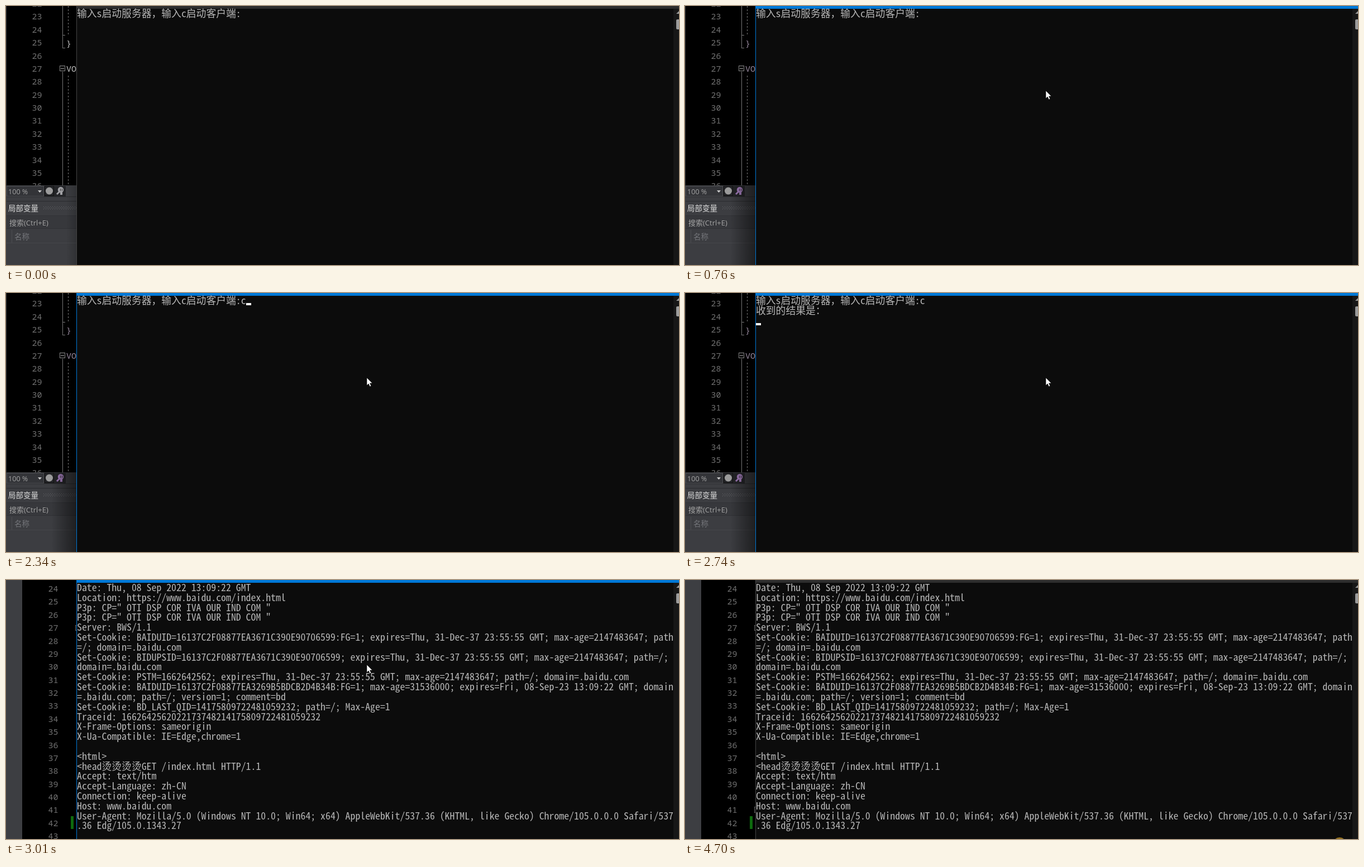
An HTML page with a canvas for the animation above (4770 ms loop, 1205x465 px).

```html
<!DOCTYPE html>
<html lang="zh-CN">
<head>
<meta charset="utf-8">
<style>
  html, body { margin: 0; width: 100%; height: 100%; overflow: hidden; background: #000; }
  canvas { display: block; }
</style>
</head>
<body>
<canvas id="stage" width="1205" height="465"></canvas>
<script>
const ctx = document.getElementById('stage').getContext('2d');
const LOOP = 4770, CELL = 8.9, ROW = 17.81, LEFT = 127;
const MONO = '"Noto Sans Mono CJK SC", "Liberation Mono", monospace';
const UI = '"Open Sans", "Noto Sans CJK SC", "Noto Sans CJK", sans-serif';
const CODE = '"Noto Sans Mono", monospace';

// Latin characters fill one terminal cell, Chinese ones two.
ctx.font = `300 100px ${MONO}`;
const latinFont = `300 ${CELL * 100 / ctx.measureText('M').width}px ${MONO}`;
const wideFont = `300 ${CELL * 2}px "Noto Sans Mono CJK SC", "Noto Sans CJK SC", "Noto Sans CJK", sans-serif`;

const PROMPT = '输入s启动服务器，输入c启动客户端:';
const RESPONSE = `Date: Thu, 08 Sep 2022 13:09:22 GMT
Location: https://www.baidu.com/index.html
P3p: CP=" OTI DSP COR IVA OUR IND COM "
P3p: CP=" OTI DSP COR IVA OUR IND COM "
Server: BWS/1.1
Set-Cookie: BAIDUID=16137C2F08877EA3671C390E90706599:FG=1; expires=Thu, 31-Dec-37 23:55:55 GMT; max-age=2147483647; path
=/; domain=.baidu.com
Set-Cookie: BIDUPSID=16137C2F08877EA3671C390E90706599; expires=Thu, 31-Dec-37 23:55:55 GMT; max-age=2147483647; path=/;
domain=.baidu.com
Set-Cookie: PSTM=1662642562; expires=Thu, 31-Dec-37 23:55:55 GMT; max-age=2147483647; path=/; domain=.baidu.com
Set-Cookie: BAIDUID=16137C2F08877EA3269B5BDCB2D4B34B:FG=1; max-age=31536000; expires=Fri, 08-Sep-23 13:09:22 GMT; domain
=.baidu.com; path=/; version=1; comment=bd
Set-Cookie: BD_LAST_QID=14175809722481059232; path=/; Max-Age=1
Traceid: 1662642562022173748214175809722481059232
X-Frame-Options: sameorigin
X-Ua-Compatible: IE=Edge,chrome=1

<html>
<head烫烫烫烫GET /index.html HTTP/1.1
Accept: text/htm
Accept-Language: zh-CN
Connection: keep-alive
Host: www.baidu.com
User-Agent: Mozilla/5.0 (Windows NT 10.0; Win64; x64) AppleWebKit/537.36 (KHTML, like Gecko) Chrome/105.0.0.0 Safari/537
.36 Edg/105.0.1343.27`;

// Pointer positions: [from ms, x, y]
const POINTER = [
  [130, 1093, 441], [200, 968, 374], [270, 826, 292], [340, 714, 222],
  [410, 648, 176], [480, 624, 159], [550, 632, 154], [620, 646, 153],
  [760, 646, 152], [3810, 692, 200], [3880, 806, 312], [3950, 963, 452], [4020, 0, -50]
];

function box(x, y, w, h, color) {
  ctx.fillStyle = color;
  ctx.fillRect(x, y, w, h);
}

function frame(x, y, w, h, color) {
  ctx.strokeStyle = color;
  ctx.strokeRect(x + .5, y + .5, w - 1, h - 1);
}

function shape(color, ...points) {
  ctx.fillStyle = color;
  ctx.beginPath();
  points.forEach(([x, y]) => ctx.lineTo(x, y));
  ctx.closePath();
  ctx.fill();
}

function disc(x, y, r, color) {
  ctx.fillStyle = color;
  ctx.beginPath();
  ctx.arc(x, y, r, 0, 7);
  ctx.fill();
}

function label(text, x, y, color, font, align = 'left') {
  ctx.font = font;
  ctx.fillStyle = color;
  ctx.textAlign = align;
  ctx.fillText(text, x, y);
}

function lineNumbers(first, last, right, y) {
  for (let n = first; n <= last; n++)
    label(n, right, Math.round(y + (n - first) * 23.38), '#707070', `15px ${CODE}`, 'right');
}

function dashes(x, from, to) {
  for (let y = from; y < to; y += 6) box(x, y, 1, Math.min(3, to - y), '#777');
}

function editorWithPanel(active) {
  const codeColor = active ? '#95879c' : '#c0c0c0';
  lineNumbers(22, 36, 64.5, 1);
  box(101, 0, 1, 76, '#777');
  box(101, 52, 5, 1, '#777');
  box(101, 75, 5, 1, '#777');
  dashes(111, 0, 53);
  box(101, 118, 1, 205, '#777');
  dashes(111, 125, 322);
  frame(96, 107, 10, 10, '#888');
  box(98, 112, 6, 1, '#aaa');
  label('}', 108, 71.5, codeColor, `15px ${CODE}`);
  label('VO', 108, 118, codeColor, `15px ${CODE}`);

  // Zoom bar
  box(0, 322, 126, 143, '#3c3d41');
  box(1, 323, 66, 19, '#333438');
  frame(1, 323, 67, 19, '#4b4c50');
  label('100 %', 4, 337.5, '#a4a4a4', `12.6px ${UI}`);
  shape('#ccc', [57, 331], [64, 331], [60.5, 335]);
  box(68, 323, 39, 19, '#242528');
  frame(69, 323, 17, 18, '#111');
  disc(77.5, 332, 6.5, '#9b9b9b');
  const tool = active ? '#a27cba' : '#a0a0a4';
  disc(98, 330, 5.2, tool);
  shape(tool, [90, 337], [92, 339], [97, 334], [95, 332]);
  box(97, 333, 4, 6, tool);
  box(97, 328, 1, 4, '#333');
  box(100, 328, 1, 4, '#333');
  box(0, 342, 126, 1, '#2c2d30');

  // Locals panel
  box(0, 350, 126, 1, '#2a2b2e');
  label('局部变量', 4, 368, '#ddd', `13.5px ${UI}`);
  for (let x = 67; x < 126; x += 4) {
    box(x, 360, 1, 1, '#66676b');
    box(x + 2, 362, 1, 1, '#66676b');
    box(x, 364, 1, 1, '#66676b');
  }
  box(0, 376, 126, 24, '#37383c');
  frame(0, 376, 130, 24, '#303135');
  label('搜索(Ctrl+E)', 6, 394, '#a4a4a4', `13px ${UI}`);
  box(10, 402, 1, 23, '#4b4c50');
  box(1, 425, 125, 1, '#46474b');
  label('名称', 15, 419, '#74757a', `13.5px ${UI}`);
  box(0, 0, 1, 465, '#3c3d41');
}

function editorOnly(time) {
  box(0, 0, 29, 465, '#3d3e42');
  lineNumbers(24, 43, 93.5, 21);
  box(116, 424, 5, 23, '#0e6a0e');
  if (time >= 3010) frame(124, 81, 9, 10, '#666');
  if (time >= 3280) frame(124, 407, 9, 11, '#666');
}

function terminalLine(text, row) {
  const baseline = Math.round(20 + row * ROW);
  let col = 0;
  ctx.textAlign = 'left';
  ctx.fillStyle = '#b8b8b8';
  for (const ch of text) {
    const wide = ch > '\u00ff';
    ctx.font = wide ? wideFont : latinFont;
    ctx.fillText(ch, LEFT + col * CELL, baseline);
    col += wide ? 2 : 1;
  }
}

function caret(col, row) {
  box(Math.round(LEFT + col * CELL), Math.round(18 + row * ROW), 9, 4, '#fff');
}

function terminal(time, active) {
  const accent = active ? '#0078d7' : '#2d2d2d';
  box(126, 0, 1079, 465, '#0c0c0c');
  box(126, 0, 1079, 5, accent);
  box(126, 0, 1, 465, active ? accent : '#444');
  box(1195, 5, 10, 460, '#171717');
  shape('#999', [1200, 14], [1205, 9], [1205, 14]);
  ctx.fillStyle = '#9c9c9c';
  ctx.beginPath();
  ctx.roundRect(1200, 24, 12, 18, 2);
  ctx.fill();

  if (time >= 2810) {
    RESPONSE.split('\n').forEach(terminalLine);
    return;
  }
  terminalLine(PROMPT + (time >= 1610 ? 'c' : ''), 0);
  if (time >= 2740) {
    terminalLine('收到的结果是：', 1);
    caret(0, 2);
  } else if (time >= 2670) caret(0, 1);
  else if (time >= 2340 || time >= 1610 && time < 1810) caret(34, 0);
  else if (time >= 1280 && time < 1610) caret(33, 0);
}

function pointer(time) {
  const step = POINTER.findLast(([from]) => time >= from);
  if (!step) return;
  ctx.save();
  ctx.translate(step[1], step[2]);
  shape('#fff', [0, 0], [0, 14], [3.2, 11], [5.4, 16], [7.8, 15], [5.6, 10], [10, 10]);
  ctx.strokeStyle = '#000';
  ctx.lineWidth = .6;
  ctx.stroke();
  ctx.restore();
}

function shadow(width, alpha) {
  const fade = ctx.createLinearGradient(126 - width, 0, 126, 0);
  fade.addColorStop(0, 'rgba(0,0,0,0)');
  fade.addColorStop(1, `rgba(0,0,0,${alpha})`);
  box(126 - width, 322, width, 143, fade);
}

function draw(now) {
  const time = now % LOOP;
  const active = time >= 760 && time < 4700;
  box(0, 0, 1205, 465, '#000');
  if (time < 2880) {
    editorWithPanel(active);
    shadow(active ? 45 : 18, active ? .5 : .2);
  } else editorOnly(time);
  terminal(time, active);
  if (time >= 4700) disc(1172, 474, 12, '#94701f');
  pointer(time);
  requestAnimationFrame(draw);
}
requestAnimationFrame(draw);
</script>
</body>
</html>
```
